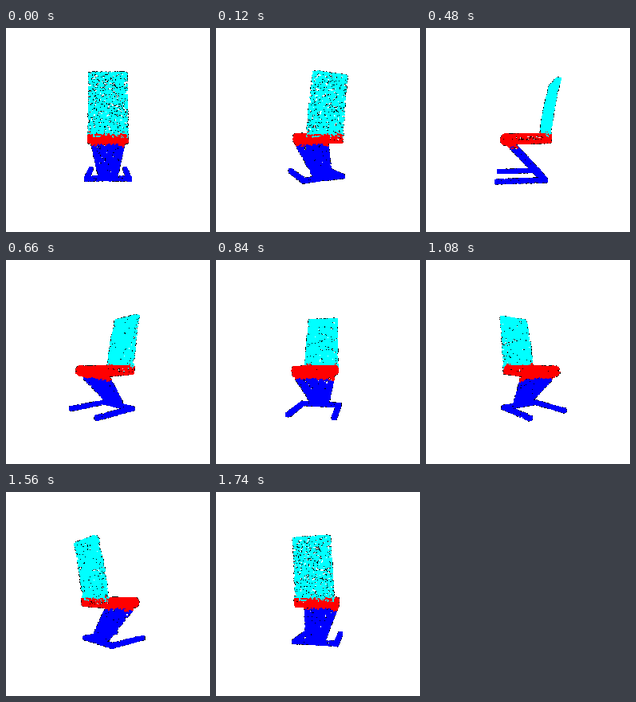
A matplotlib script for the animation above (1800 ms loop, 256 px wide and 256 px high).

```python
import numpy as np
import matplotlib.pyplot as plt
from matplotlib.animation import FuncAnimation

SIZE, DPI = 256, 100
FRAMES, INTERVAL = 30, 60
CAM = 230  # camera distance; one unit is one pixel at the axis
CYAN, RED, BLUE, BLACK = (0, 1, 1), (1, 0, 0), (0, 0, 1), (0, 0, 0)
DOT, RIM = 0.74, 1.0  # dot and dark rim radius in pixels

# Joints of the Z-shaped side profile as (height, depth)
TOP, HIP = (60.8, 34.2), (-7.5, 21.3)
SEAT_BACK, SEAT_FRONT = (-9.9, 24.2), (-11, -27)
KNEE, HEEL = (-17.5, -21), (-56, 14.5)
FLOOR, BAR, TAIL, TOE = -56.7, 14, 18.2, -38.5
WIDTH = 22.3

rng = np.random.default_rng(7)


def lerp(a, b, t):
    return a + (b - a) * t


def plate(n, start, end, half, thick, edge=0.2, bow=0, x0=0):
    """Points on a slab from start to end; thick is half its depth as (y, z)."""
    t, (x, s) = rng.random(n), rng.uniform(-1, 1, (2, n))
    kind = rng.random(n)
    s = np.where(kind > edge, np.sign(s), s)
    x = np.where(kind < edge / 2, np.sign(x), x)
    t = np.where((kind > edge / 2) & (kind < edge), np.round(t), t)
    y = lerp(start[0], end[0], t) + s * thick[0]
    z = lerp(start[1], end[1], t) + s * thick[1] - bow * np.sin(np.pi * t)
    return np.column_stack([x0 + x * lerp(*half, t), y, z]), s


def roll(n, center, r, half):
    """Points on a closed cylinder lying along x."""
    a = rng.uniform(0, 2 * np.pi, n)
    x = rng.uniform(-half, half, n)
    cap = rng.random(n) < 0.2
    x = np.where(cap, np.sign(x) * half, x)
    r = np.where(cap, r * np.sqrt(rng.random(n)), r)
    return np.column_stack([x, center[0] + r * np.sin(a),
                            center[1] + r * np.cos(a)])


def paint(mask, yes, no):
    return np.where(mask[:, None], yes, no).astype(float)


def build():
    back, s = plate(1450, HIP, TOP, (WIDTH, 19.8), (0, 2.2), 0.12, 1.5)
    seam = -6.3 - 1.8 * s + rng.normal(0, 1.3, len(s))
    back_color = paint(back[:, 1] > seam, CYAN, RED)

    seat, _ = plate(1250, SEAT_FRONT, SEAT_BACK, (WIDTH, WIDTH), (4.6, 0))
    red = np.vstack([seat, roll(500, SEAT_FRONT, 5.6, WIDTH)])

    # The red reaches lower towards the sides of the leg's rear face.
    leg, s = plate(1100, KNEE, HEEL, (WIDTH, 10.2), (0, 4))
    seam = -19 - 2.3 * (s + 1) * (leg[:, 0] / WIDTH) ** 2
    seam += rng.normal(0, 0.6, len(s))
    leg_color = paint(leg[:, 1] > seam, RED, BLUE)

    blue = [plate(360, (FLOOR, BAR), (FLOOR, TAIL), (26.5, 26.5), (1.8, 0), 0.4)[0]]
    for side in (-1, 1):
        blue.append(plate(360, (FLOOR, TOE), (FLOOR, TAIL), (1.8, 1.8),
                          (1.8, 0), 0.6, x0=side * 24.8)[0])
    blue = np.vstack(blue)

    points = np.vstack([back, red, leg, blue])
    colors = np.vstack([back_color, np.tile(RED, (len(red), 1)), leg_color,
                        np.tile(BLUE, (len(blue), 1))])
    return points, colors


def project(angle):
    x, y, z = points.T
    c, s = np.cos(angle), np.sin(angle)
    depth = z * c - x * s
    k = CAM / (CAM - depth)
    xy = np.column_stack([x * c + z * s, -y]) * k[:, None] + SIZE / 2
    return xy, np.argsort(depth)


points, colors = build()
count = len(points)
rims = np.tile(BLACK, (count, 1))

fig = plt.figure(figsize=(SIZE / DPI, SIZE / DPI), dpi=DPI, facecolor="white")
ax = fig.add_axes([0, 0, 1, 1])
ax.set(xlim=(0, SIZE), ylim=(SIZE, 0))
ax.axis("off")

# Dark rims lie under every coloured dot.
sizes = (np.repeat([RIM, DOT], count) * 2 * 72 / DPI) ** 2
cloud = ax.scatter(np.zeros(2 * count), np.zeros(2 * count), s=sizes,
                   c=np.vstack([rims, colors]), linewidths=0, antialiased=False)


def draw(i):
    xy, order = project(2 * np.pi * i / FRAMES)
    cloud.set_offsets(np.vstack([xy, xy[order]]))
    cloud.set_facecolors(np.vstack([rims, colors[order]]))
    return [cloud]


anim = FuncAnimation(fig, draw, frames=FRAMES, interval=INTERVAL,
                     init_func=lambda: draw(0), repeat=True, repeat_delay=0)
plt.show()
```
